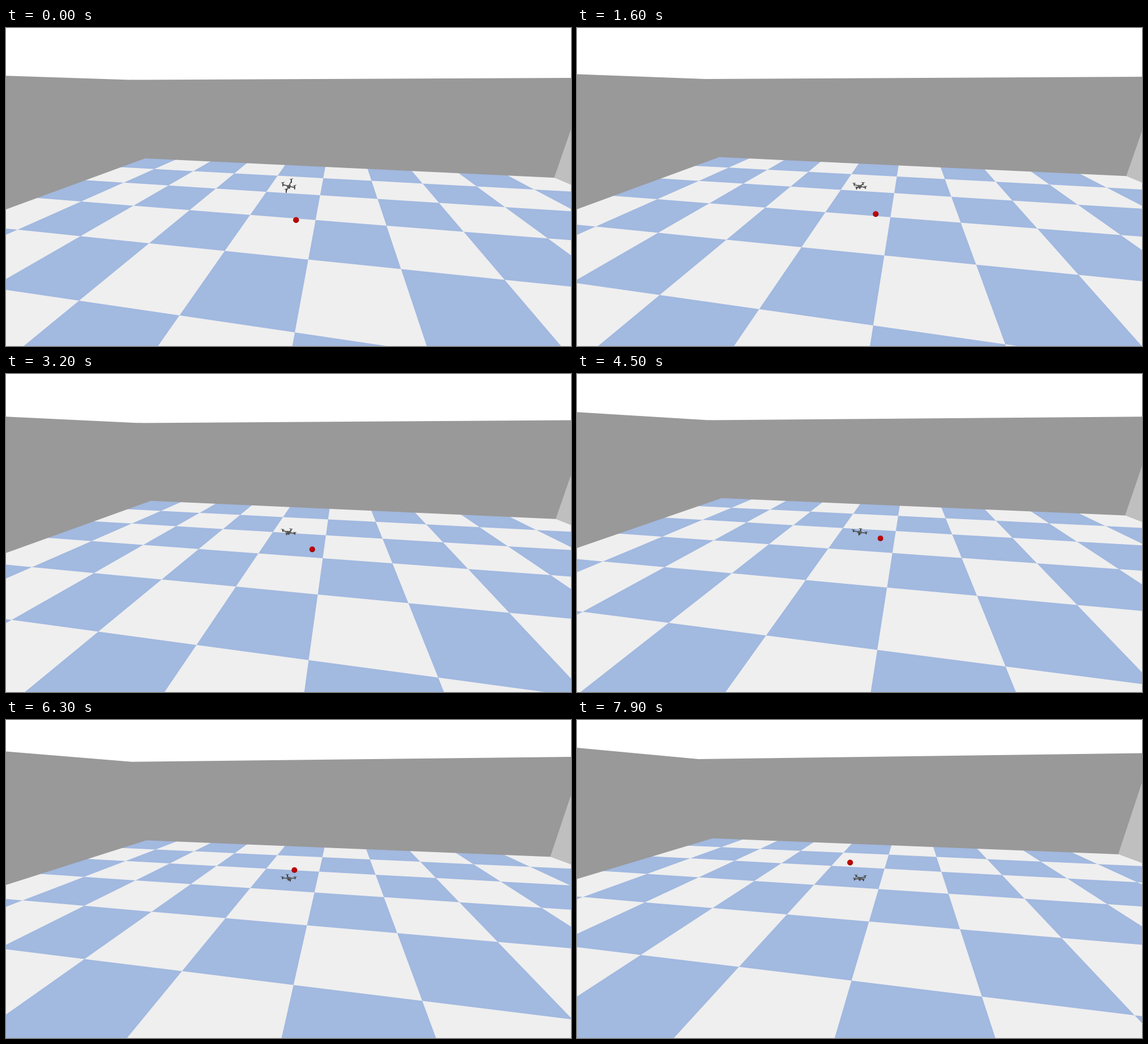
An HTML page with a canvas that plays this animation: 998x561 px, repeating every 8 s.

```html
<!DOCTYPE html>
<html>
<head>
<meta charset="utf-8">
<style>
html, body { margin: 0; width: 100%; height: 100%; overflow: hidden; background: #fff; }
canvas { display: block; width: 998px; height: 561px; }
</style>
</head>
<body>
<canvas id="stage" width="998" height="561"></canvas>
<script>
const ctx = document.getElementById('stage').getContext('2d');
const { sin, cos, tanh, cosh, log, exp, PI } = Math;
const LOOP = 8000, STEP = 100;
const CX = 499, CY = 280.5, FOCAL = CY / Math.tan(PI / 6);
const PITCH = PI / 9, YAW = PI / 18;
const cosP = cos(PITCH), sinP = sin(PITCH), cosY = cos(YAW), sinY = sin(YAW);
const ROOM = 4.9, WALL = 2, NEAR = 0.1;

let cam;

// The camera follows the drone: it drifts left then right, backs off, and sinks (t from 0 to 1)
const cameraAt = t => [
  0.0869 + 0.123 * t + 0.038 * log(cosh(10 * (t - 0.47))),
  -1.709 - 0.095 * t - 0.062 * sin(5 * (t - 0.27)),
  1.6704 - 0.1813 * tanh((t - 0.63) / 0.38)
];

function toView([x, y, z]) {
  const dx = x - cam[0], dy = y - cam[1], dz = z - cam[2];
  const fwd = dy * cosY - dx * sinY;
  return [dx * cosY + dy * sinY, -dz * cosP - fwd * sinP, fwd * cosP - dz * sinP];
}

const toScreen = ([x, y, d]) => [CX + FOCAL * x / d, CY + FOCAL * y / d];

// Adds a 3D polygon to the path, cut at the near plane
function addPoly(points) {
  const view = points.map(toView), out = [];
  view.forEach((a, i) => {
    const b = view[(i + 1) % view.length];
    if (a[2] > NEAR) out.push(a);
    if ((a[2] > NEAR) !== (b[2] > NEAR)) {
      const s = (NEAR - a[2]) / (b[2] - a[2]);
      out.push(a.map((v, n) => v + (b[n] - v) * s));
    }
  });
  out.map(toScreen).forEach((p, i) => i ? ctx.lineTo(...p) : ctx.moveTo(...p));
  ctx.closePath();
}

function fill(color, ...polys) {
  ctx.fillStyle = color;
  ctx.beginPath();
  polys.forEach(addPoly);
  ctx.fill();
}

const floor = (x, y, w) => [[x, y, 0], [x + w, y, 0], [x + w, y + w, 0], [x, y + w, 0]];
const wall = (x1, y1, x2, y2) => [[x1, y1, 0], [x2, y2, 0], [x2, y2, WALL], [x1, y1, WALL]];

function drawRoom() {
  const blue = [];
  for (let x = -5; x < 5; x++)
    for (let y = -5; y < 5; y++)
      if ((x + y) & 1) blue.push(floor(x, y, 1));
  fill('#efefef', floor(-5, -5, 10));
  fill('#a2b9e0', ...blue);
  // Walls overlap a little past the corners so that no seam shows
  fill('#999999', wall(-ROOM, -ROOM, -ROOM, 5.2));
  fill('#999999', wall(-ROOM, ROOM, 5.2, ROOM));
  fill('#bfbfbf', wall(ROOM, -ROOM, ROOM, ROOM));
}

function line(color, width, x1, y1, x2, y2) {
  ctx.strokeStyle = color;
  ctx.lineWidth = width;
  ctx.beginPath();
  ctx.moveTo(x1, y1);
  ctx.lineTo(x2, y2);
  ctx.stroke();
}

// The drone starts tipped towards the viewer, levels out and turns slowly
function drawDrone(t) {
  const tip = exp(-10 * t);
  const turn = 0.62 - 1.25 * t ** 1.5;
  const roll = 0.14 * sin(PI * t) - 0.26 * tip;
  const depth = 4 + 5 * tip, post = 2.3 + 1.5 * tip;
  ctx.save();
  ctx.translate(499.5, 279);
  for (let i = 0; i < 4; i++) {
    const a = turn + i * PI / 2;
    const ax = 11.5 * cos(a), ay = depth * sin(a);
    const x = ax * cos(roll) - ay * sin(roll), y = ax * sin(roll) + ay * cos(roll);
    line('#4a4a4a', 1.6, 0, 0, x, y);
    line('#3a3a3a', 1.8, x, y - post, x, y + post * 0.8);
    line('#555555', 1, x - 3, y - post - 3 * roll, x + 3, y - post + 3 * roll);
  }
  ctx.rotate(roll);
  ctx.fillStyle = '#5c5c5c';
  ctx.fillRect(-3.5, -2, 7, 4.5);
  ctx.fillStyle = '#444444';
  ctx.fillRect(-1.5, 1.5, 3, 3);
  ctx.restore();
}

// The ball hangs still in the room; only the camera moves
function drawBall() {
  const view = toView([0, 0, 0.997]);
  const [x, y] = toScreen(view), r = 0.02 * FOCAL / view[2];
  const shade = ctx.createRadialGradient(x - 1, y - 2, 1, x - 1, y - 2, 2 * r);
  shade.addColorStop(0, '#c20808');
  shade.addColorStop(0.45, '#b20404');
  shade.addColorStop(1, '#650000');
  ctx.fillStyle = shade;
  ctx.beginPath();
  ctx.arc(x, y, r, 0, 2 * PI);
  ctx.fill();
}

const start = performance.now();

function draw() {
  const now = Math.max(0, performance.now() - start) % LOOP;
  const t = Math.floor(now / STEP) * STEP / LOOP;
  cam = cameraAt(t);
  ctx.clearRect(0, 0, 998, 561);
  drawRoom();
  drawDrone(t);
  drawBall();
  requestAnimationFrame(draw);
}
draw();
</script>
</body>
</html>
```
